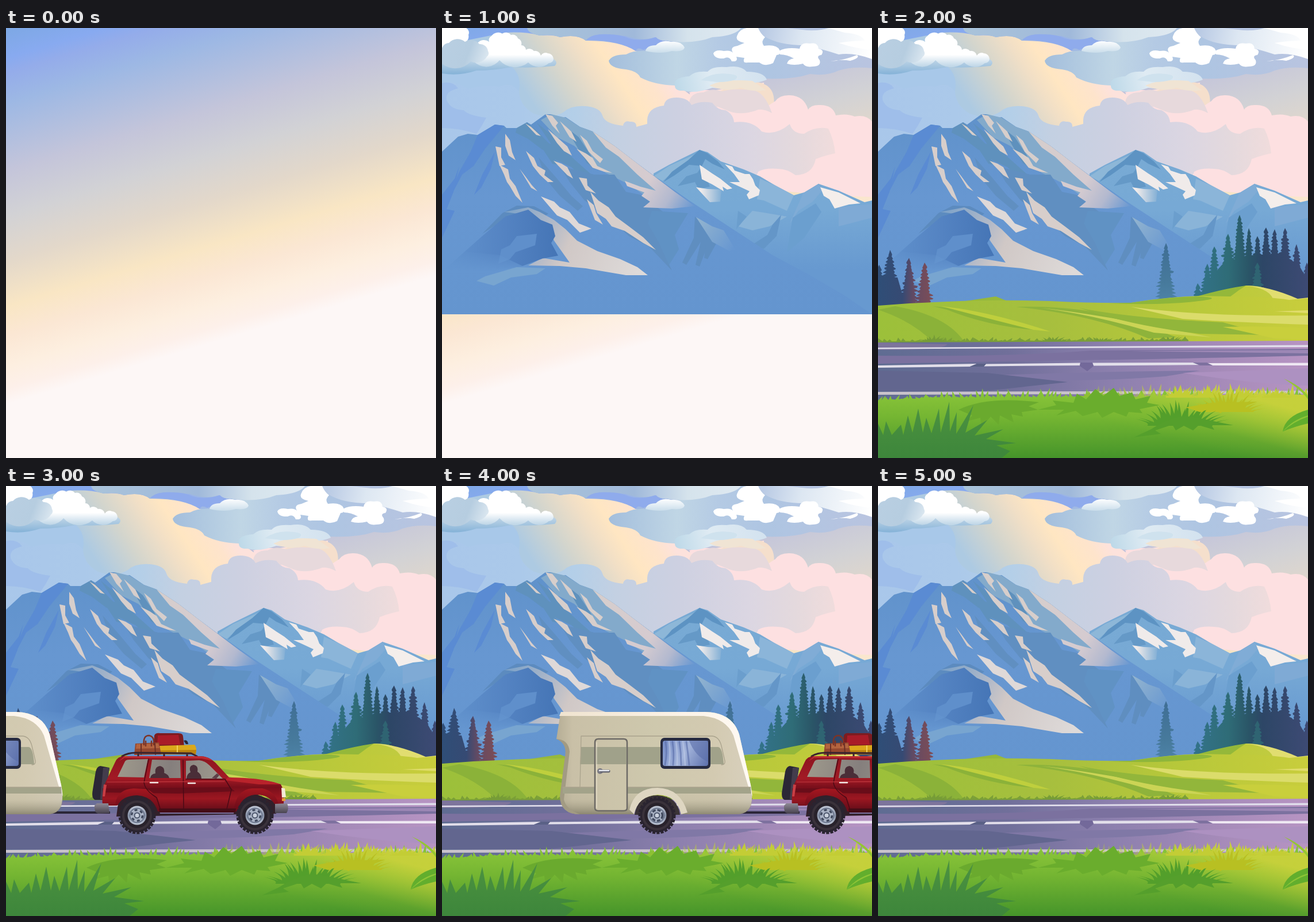
An HTML page that plays this animation: 748x748 px, repeating every 5.5 s.

```html
<!DOCTYPE html>
<html lang="en">
<head>
<meta charset="utf-8">
<title>Mountain road trip</title>
<style>
html,body{margin:0;width:100%;height:100%;overflow:hidden;background:#fdf7f6}
svg{display:block;width:100vw;height:100vh}
</style>
</head>
<body>
<svg id="stage" viewBox="0 0 748 748"><defs></defs></svg>
<script>
const stage = document.getElementById('stage');
const defs = stage.firstChild;

function el(tag, attrs, parent) {
  const e = document.createElementNS('http://www.w3.org/2000/svg', tag);
  for (const k in attrs) e.setAttribute(k, attrs[k]);
  parent.append(e);
  return e;
}
const layer = (parent = stage, attrs = {}) => el('g', attrs, parent);

function grad(id, x1, y1, x2, y2, stops) {
  const g = el('linearGradient', {id, x1, y1, x2, y2, gradientUnits: 'userSpaceOnUse'}, defs);
  stops.split(',').forEach(s => {
    const [offset, color, alpha = 1] = s.trim().split(' ');
    el('stop', {offset, 'stop-color': color, 'stop-opacity': alpha}, g);
  });
}
const paint = f => f[0] === '#' ? f : `url(#${f})`;
const path = (g, fill, d, more = {}) => el('path', {d, fill: paint(fill), ...more}, g);
const line = (g, color, width, d) =>
  path(g, '#0000', d, {stroke: color, 'stroke-width': width, 'stroke-linecap': 'round', 'stroke-linejoin': 'round'});
const box = (g, fill, x, y, width, height, rx = 0) => el('rect', {x, y, width, height, rx, fill: paint(fill)}, g);
const disc = (g, fill, cx, cy, r, more = {}) => el('circle', {cx, cy, r, fill: paint(fill), ...more}, g);

// One path per line: fill, then outline
function shapes(g, text) {
  text.trim().split('\n').forEach(row => {
    const [, fill, d] = row.trim().match(/^(\S+) (.+)$/);
    path(g, fill, d);
  });
}

// Cloud outline: flat lobes between clockwise points, long sides stay straight
function puff(g, fill, text) {
  const pts = text.split(' ').map(p => p.split(',').map(Number));
  let d = 'M' + pts[0];
  pts.forEach((p, i) => {
    const q = pts[(i + 1) % pts.length];
    const len = Math.hypot(q[0] - p[0], q[1] - p[1]);
    const r = len * .72;
    d += len > 75 ? `L${q}` : `A${r} ${r} 0 0 1 ${q}`;
  });
  path(g, fill, d + 'Z');
}

let seed = 7;
const rnd = () => (seed = seed * 16807 % 2147483647) / 2147483647;

function tree(g, fill, x, top, bottom, w) {
  const left = [], right = [];
  const side = (pts, dir, y, half) => {
    const reach = half * (.7 + rnd() * .5);
    pts.push([x + dir * reach, y + 1 + rnd() * 3], [x + dir * reach * .9, y + 4], [x + dir * half * .6, y + 5]);
  };
  for (let y = top + 6; y < bottom; y += 6) {
    const half = 2 + w * ((y - top) / (bottom - top)) ** .8;
    side(left, -1, y, half);
    side(right, 1, y, half);
  }
  path(g, fill, `M${x},${top}L${right.join('L')}L${left.reverse().join('L')}Z`);
}

// Row of blades on a base line that runs from y0 to y1
function fringe(g, fill, x0, x1, y0, y1, h, step, deep = 8) {
  let d = `M${x0},${y0 + deep}`;
  for (let x = x0; x < x1; x += step) {
    const y = y0 + (y1 - y0) * (x - x0) / (x1 - x0);
    d += `L${x},${y}L${x + step * (rnd() * 1.8 - .4)},${y - h * rnd()}`;
  }
  path(g, fill, d + `L${x1},${y1}L${x1},${y1 + deep}Z`);
}

// Fan of curved blades
function bush(g, fill, cx, cy, w, h, n) {
  let d = '';
  for (let i = 0; i < n; i++) {
    const u = i / (n - 1) * 2 - 1;
    const x = cx + u * w * .6, tx = cx + u * w + rnd() * 8;
    const ty = cy - h * (1 - .75 * u * u) * (.6 + rnd() * .4);
    const b = w / n * 1.5;
    d += `M${x - b},${cy}Q${x},${(cy + ty) / 2} ${tx},${ty}Q${x + b},${(cy + ty) / 2} ${x + b},${cy}Z`;
  }
  path(g, fill, d);
}

grad('sky', 0, 0, 180, 601, '0 #7da8e4,.08 #88aaf0,.12 #94acea,.2 #9db8e4,.38 #c4c5da,.5 #d2d2d5,.62 #e3d8ca,.74 #f9e6c4,.82 #fbe7d4,.9 #fdefe0,.96 #fdf0ea,1 #fdf7f6');
grad('sun', 150, 120, 333, -1, '0 #adcae2,.29 #d3d5cd,.53 #f1dfc6,.68 #ffe6c2,.87 #fee4cc,1 #fde2dc');
grad('bank', 0, 0, 684, 0, '0 #a9c7ea,.2 #abc9ea,.34 #b4cfe8,.44 #c3d0e2,.6 #cdd0e1,.78 #dbd6e2,.9 #e4d9dd,1 #f0dcdc');
grad('mist', 290, 0, 748, 0, '0 #a3bedc,.26 #c0d6e5,.42 #b4cae4,.6 #aec5e2,1 #b9c4e0');
grad('fade', 0, 10, 0, 66, '0 #ffffff,.65 #ffffff,1 #c2d8e8');
grad('shelf', 0, 52, 0, 80, '0 #c6d9e8,1 #86b3d8');
grad('haze', 0, 20, 80, 50, '0 #b9cfe2,.6 #b6cde0,1 #dbe7f0');
grad('veil', 405, 105, 560, 70, '0 #bcd8e8,.4 #dfebf3,1 #d3e2ef');
grad('top', 150, 0, 520, 0, '0 #a9c3da,.5 #a0b9da,.75 #d5e3ec,1 #dfe9f1');
grad('wing', 560, 0, 748, 40, '0 #b9cae4,.35 #dde7f2,1 #ffffff');
grad('small', 0, 22, 0, 44, '0 #ffffff,1 #c8dcea');

const base = layer();
box(base, 'sky', 0, 0, 748, 748);

const clouds = layer();
shapes(clouds, `
sun M0,30L110,8Q145,6 170,13Q195,11 205,16Q235,10 250,22Q310,22 337,40Q372,50 385,80L430,115L560,95L560,282Q500,276 465,276Q390,290 270,290L0,279Z
#f5dfcc M480,112Q535,82 565,100Q582,112 576,140L500,140Z
#fde0e1 M430,112Q470,100 500,122L560,140L580,127Q588,116 605,117Q630,118 637,142Q642,133 658,134Q680,134 685,152Q704,148 718,154Q738,150 748,163L748,294Q620,290 515,273L480,200Z
#e7d9dc M430,136Q428,112 455,112Q470,104 487,110Q510,104 538,108Q560,108 574,148Q555,138 545,144Q520,152 500,145L480,137Z
bank M0,75L60,80L100,100Q120,95 134,108Q134,135 160,149Q190,160 212,146Q225,134 250,136Q275,138 279,152Q283,167 315,170Q317,160 327,163Q339,162 338,172L360,166L360,262Q340,275 320,288L270,290Q140,284 40,277L0,279Z
bank M357,263L357,160Q358,138 386,135Q388,120 410,121Q428,122 434,134Q450,126 470,130Q480,143 493,143Q507,150 508,164Q540,160 556,180Q580,188 605,167Q610,184 630,184Q650,170 672,175Q682,195 684,218Q665,222 650,228Q645,255 615,256Q600,245 585,245Q562,243 550,250Q545,266 520,266L515,273Q490,272 489,266L487,250Q478,264 465,262Q440,282 400,279Q385,265 357,263Z
#9fbeea M0,95Q20,92 28,105Q5,110 8,125Q14,142 38,143Q45,152 77,156L68,172L60,184Q30,174 0,174Z
#a8c8e9 M0,65L110,60Q140,75 134,110Q120,92 100,102Q70,98 45,106Q20,90 0,96Z
mist M290,57Q296,46 320,46Q335,38 360,40Q385,30 420,22L470,0L748,0L748,70Q715,66 690,74Q670,84 640,80Q610,90 565,88Q530,96 500,98L405,100Q370,99 345,86Q340,75 320,72Q292,70 290,57Z
top M148,0L520,0Q510,14 470,16Q440,28 395,23Q380,24 370,16Q350,24 320,14Q300,12 290,12Q262,9 250,22Q236,10 205,16Q190,10 172,13Q150,10 148,0Z
#8fabec M252,20Q262,9 290,11Q310,11 325,18Q345,24 372,16Q380,24 395,22L350,38Q340,32 337,40Q310,22 252,20Z
veil M405,100Q402,86 430,84Q440,74 462,76Q470,66 495,68Q520,64 530,76Q560,76 565,90Q540,100 520,92Q500,108 470,104Q440,115 420,109Q405,110 405,100Z
#f0e4d4 M465,100Q490,88 540,92L563,108Q540,112 520,104Q490,112 465,100Z
#cfe2ee M450,91Q470,76 500,80Q520,82 510,90Q490,96 470,93Z
small M354,40Q356,30 372,30Q382,20 398,24Q416,22 422,34Q420,42 400,40Q380,46 354,40Z
shelf M0,60Q30,52 90,56L190,52Q204,58 196,66Q160,70 120,68Q90,74 60,74Q30,84 0,79Z
wing M545,0L748,0L748,54Q715,42 690,46Q660,36 630,30Q585,30 560,14Z
#b6c5e2 M600,0L672,0Q660,5 635,4Z
#ffffff M672,0L748,0L748,38Q720,36 690,26Q715,22 735,22Q730,10 700,8Z
#ffffff M676,58Q700,56 722,47Q728,52 710,57Q695,54 676,58Z
#ffffff M472,44Q476,37 490,40Q502,38 506,43Q500,33 514,31L526,26Q508,22 514,12Q518,2 530,0L550,0Q554,10 562,16Q554,24 560,31Q582,28 587,38Q592,46 582,47L576,61Q562,68 552,60L532,60Q522,62 526,52L512,50Q516,59 504,58Q500,48 490,53Q474,54 472,44Z
#ffffff M588,39Q600,33 622,36Q624,24 640,27Q654,24 655,36Q666,38 660,47Q650,48 657,56Q660,67 645,67Q632,69 628,62Q612,66 600,62Q602,54 612,53Q600,46 588,46Z
`);
puff(clouds, 'fade', '0,26 0,0 42,0 46,12 38,26 0,34');
puff(clouds, 'fade', '55,40 62,26 82,24 86,14 105,10 120,12 132,18 138,30 146,38 160,40 172,48 184,44 194,54 186,61 150,60 100,56 60,62');
puff(clouds, 'haze', '0,38 12,26 40,24 65,28 80,40 78,50 50,58 0,62');

grad('ridge', 0, 160, 0, 498, '0 #6092cb,.4 #6797d1,1 #6495cf');
grad('far', 0, 212, 0, 420, '0 #78aad4,.5 #77a9d5,1 #6799d0');
grad('knoll', 20, 0, 200, 0, '0 #6091cc,.5 #5483c2,1 #4575b6');
grad('foot', 0, 385, 0, 424, '0 #6596d0 0,1 #6596d0 1');
grad('snow', 250, 190, 440, 310, '0 #d6cecc,.6 #d5cbd0,.8 #b3b9cf,1 #6797d1');
grad('field', 100, 320, 340, 430, '0 #759fc9,.35 #b1b9c8,.5 #d0c8c6,1 #dedad9');
grad('facet', 442, 330, 510, 380, '0 #94b5cf,1 #6797d1');
grad('glint', 450, 0, 485, 0, '0 #f0ebea,1 #86b1d6');

const peaks = layer();
shapes(peaks, `
far M368,253L395,238L448,212L462,216L485,232L525,246L553,258L580,274L612,291L630,286L655,271L690,283L735,303L748,300L748,498L368,498Z
#8db7d8 M368,258L395,240L440,220L425,238L400,252L384,266Z
#8bb5d9 M553,262L580,274L612,291L600,318L560,300L548,298Z
#5d93c3 M448,212L462,218L480,232L492,246L470,236L458,228L452,240L430,238L405,256L385,268L400,250L428,230Z
#6599c7 M452,240L444,252L425,258L410,275L440,268L446,280L466,276Z
#f0ebea M448,238L470,253L484,262L505,279L496,281L488,276L490,284L470,272L462,268L452,263Z
#f0ebea M492,237L505,241L509,248L527,254L535,254L541,263L545,274L553,282L551,291L534,298L530,290L535,284L520,277L500,268L518,268L508,254Z
glint M442,277L462,280L486,281L484,302L466,303Z
#8ab4d8 M515,345L540,318L565,322L600,328L570,345L540,352Z
#6b9ecd M515,318L530,328L512,350Z
#6496c8 M590,325L582,362L560,384L535,380L566,360L575,342Z
#80acd6 M628,288L655,271L662,282L645,302L620,318L605,340Z
#7faad5 M690,312L748,306L748,330L690,345Z
#6b9fcf M610,330L650,305L660,320L630,365L600,390Z
#f4eeeb M658,277L690,286L728,305L708,307L683,314L674,298L664,292Z
ridge M0,215L28,189L45,184L62,186L92,168L108,170L112,174L130,174L148,164L155,168L180,150L190,150L205,157L215,155L240,172L262,180L300,205L335,232L370,258L430,300L500,346L575,395L640,430L700,465L748,498L0,498Z
#5a8bd3 M62,186L92,168L108,170L75,210L55,240L35,255L22,280L10,300L30,250L50,215Z
#5a8bd3 M0,290L22,262L30,240L20,285L8,315L22,318L0,365Z
#5a8bd3 M92,215L85,245L68,278L56,290L70,255Z
#83aacb M172,160L190,150L215,156L240,172L262,180L300,205L335,232L372,260L395,285L365,300L325,272L285,252L262,235L230,205L200,190Z
#5f91bd M130,174L148,164L168,182L190,205L175,212L150,193L128,182Z
#5f91bd M165,165L190,185L215,215L260,255L248,262L225,242L195,228L210,240L192,236L165,195L190,202Z
#5f91bd M215,172L238,190L258,220L270,246L252,235L238,212Z
#608fc1 M205,240L265,255L300,255L320,285L345,290L385,320L388,345L360,332L385,390L400,422L360,380L325,362L285,325L248,300L222,268Z
#608fc1 M168,225L200,262L225,292L245,310L236,318L205,292L180,262Z
#6092c4 M365,318L428,322L405,360L412,385L395,412L378,375L358,340Z
#5f8ec0 M440,328L456,345L465,370L448,415L441,412L450,372L425,412L418,408L438,365Z
#5f8ec0 M462,352L477,375L462,402L456,400Z
facet M442,329L470,345L490,352L510,385L500,388L470,372Z
snow M262,180L300,205L335,232L372,260L405,285L440,310L400,314L350,312L362,302L347,292L352,286L322,275L318,266L345,276L372,283L340,255L308,224L285,208Z
`);
shapes(peaks, `
#d7cecb M180,150L192,153L202,165L198,170L205,184L192,170Z
#d7cecb M145,166L155,172L172,188L164,186Z
#d7cecb M184,176L200,190L218,206L226,222L212,214L200,200Z
#d7cecb M205,162L225,180L234,198L222,190Z
#d7cecb M234,210L250,218L262,226L270,240L296,252L282,250L262,243L250,228Z
#d7cecb M240,186L252,196L262,214L280,228L275,235L255,215Z
#d7cecb M110,184L118,195L122,216L128,230L116,222L110,205Z
#d7cecb M93,206L103,208L103,225L110,238L100,240Z
#d7cecb M100,238L115,246L118,262L128,275L140,304L128,292L118,275L113,268L108,255Z
#d7cecb M146,214L160,226L166,240L180,248L178,256L194,268L184,268L170,255L158,240Z
#d7cecb M135,245L145,258L156,273L166,284L155,278Z
#d7cecb M194,231L208,236L218,242L228,262L218,256Z
#d7cecb M238,260L252,262L253,274L268,288L250,282Z
#d7cecb M258,285L272,300L290,312L302,328L325,345L350,364L372,386L350,374L318,353L295,345L285,332L270,322Z
#d7cecb M252,298L264,308L268,322L280,342L266,334Z
#dfd9d8 M172,293L195,302L205,312L222,320L238,340L260,349L240,356L218,334L200,326Z
#5c8bbf M70,358L105,322L130,309L160,310L185,323L170,334L140,322L110,332Z
field M108,320L150,312L170,320L195,334L215,350L235,370L270,388L310,402L340,416L358,430L320,430L250,418L205,414L150,413L175,400L222,408L195,370L185,345L155,326Z
knoll M18,408L70,362L110,328L150,316L172,334L192,342L197,362L190,374L202,396L175,401L140,414L80,424L0,424Z
#5f8fcb M98,410L103,385L118,378L130,362L165,358L162,378L128,390L118,402Z
foot M0,385L100,395L140,414L80,425L0,425Z
#78a5d0 M75,432L130,416L180,418L165,428L120,434L90,448L60,440Z
`);

grad('pineL', 0, 0, 95, 0, '0 #2f4e77,.45 #364a73,.65 #634a63,1 #7d4d56');
grad('pineR', 550, 0, 748, 0, '0 #33738a,.3 #2f6c77,.48 #2a5567,.6 #2d4666,1 #3d4a74');
grad('pineM', 0, 374, 0, 490, '0 #3f6e95,.6 #477a9c,1 #5087ad');
grad('hill', 556, 0, 748, 0, '0 #b9c936,1 #c4cc44');

const woods = layer();
[[21, 386, 20], [2, 412, 15], [54, 400, 18], [81, 408, 15]].forEach(([x, y, w]) => tree(woods, 'pineL', x, y, 485, w));
tree(woods, 'pineM', 501, 374, 488, 19);
[[556, 444, 9], [573, 410, 14], [585, 380, 13], [609, 358, 22], [629, 325, 20], [645, 348, 14], [660, 362, 15], [675, 347, 17],
 [690, 350, 17], [708, 348, 19], [728, 376, 17], [746, 408, 14]].forEach(([x, y, w]) => tree(woods, 'pineR', x, y, 478, w));
shapes(woods, `
pineL M0,428L10,432L34,434L42,462L60,478L56,488L0,489Z
pineR M556,472L575,438L600,410L640,396L700,392L732,412L748,440L748,476Z
`);
tree(woods, '#2f6472', 660, 408, 472, 13);
shapes(woods, `
#94b83a M468,497Q560,460 640,448Q692,448 692,475L690,490Q610,490 570,498L520,511Z
#e1dd70 M640,448Q680,449 730,471L748,469L748,497L650,492Z
hill M556,504Q590,485 628,456L640,448Q690,454 688,480L684,489L748,493L748,508L742,511Q700,496 640,495Q600,512 556,504Z
`);

grad('meadow', 0, 0, 748, 0, '0 #9cc03a,.4 #a7bf3e,.7 #b7c83a,1 #c8cd3c');
grad('road', 0, 600, 748, 570, '0 #5f6c92,.3 #706f9a,.55 #8d80ae,.8 #a68bb9,1 #b794c3');
grad('turf', 0, 640, 0, 748, '0 #86c238,.35 #74b532,1 #45942a');
grad('glow', 610, 745, 640, 640, '0 #b5cb36 0,.35 #b5cb36 .15,.7 #c0cf38 .6,1 #c9d13b .95');
grad('dusk', 0, 650, 0, 748, '0 #4d9340,1 #3d863b');

const land = layer();
shapes(land, `
#96b83c M120,480Q165,473 205,467L230,477Z
meadow M0,483Q60,478 120,476Q200,472 300,475Q380,479 440,478Q500,468 560,466L610,467Q680,467 715,473L748,470L748,547L0,549Z
#8bb239 M0,490Q60,510 95,546L150,546Q120,500 30,484Z
#8bb239 M95,484Q180,490 290,526Q200,522 120,490Z
#bfcf3d M110,484Q190,492 300,528L270,525Q190,505 110,484Z
#8eb33b M240,485Q340,482 420,504L520,538L470,540Q380,500 240,485Z
#cbd455 M285,487Q400,500 580,538L480,530Q380,500 285,487Z
#92b63b M350,487Q440,505 600,512L680,534L560,532Q440,518 350,487Z
#dbdc6b M440,485Q560,502 748,500L748,516Q620,512 530,506Z
#8fb63a M440,478Q500,468 560,467Q610,470 540,477Q480,482 400,479Z
#e0dc6b M690,493L748,491L748,496Z
#c9cf3c M600,520Q680,518 748,522L748,542L690,540Z
`);
fringe(land, '#7b9f38', 0, 540, 545, 543, 7, 8, 5);
[[95, 30, 13], [305, 32, 12], [390, 26, 10], [510, 28, 11]].forEach(([x, w, h]) => bush(land, '#769c37', x, 546, w, h, 12));
shapes(land, `
road M0,547L748,544L748,650L0,650Z
#7d749c M0,547L120,550Q120,558 40,560L0,560Z
#7b719f M0,570Q240,572 370,561L748,558L748,570Q500,576 330,578L0,584Z
#9c87b5 M440,562L748,560L748,566Z
#8078a6 M180,605Q360,598 560,596L500,606Q320,620 180,605Z
#ad91c1 M530,600L748,592L748,622Q660,620 530,600Z
#62668f M0,596L190,600L330,616L180,632L0,632Z
#e0ddeb M0,556L748,551.5L748,555L0,558.5Z
#e2dfea M0,587L172,584L160,589L0,591Z
#e2dfea M188,584.5L352,582.5L351,587L184,588.5Z
#e2dfea M373,582.5L548,582L560,586L375,587.5Z
#eee7f2 M572,583L748,582.5L748,587L582,587Z
#5a6186 M160,589L172,584L188,584L184,589Z
#73699a M352,582L373,582L375,588L364,597L351,588Z
#7d719f M548,582L572,582L582,587L560,587Z
#c9c3cc M0,633L748,631L748,636L0,638Z
`);
fringe(land, 'turf', 0, 112, 648, 642, 9, 6, 110);
fringe(land, 'turf', 108, 748, 643, 640, 17, 7, 110);
path(land, 'turf', 'M0,648L748,640L748,748L0,748Z');
fringe(land, 'glow', 380, 748, 640, 638, 22, 8, 110);
bush(land, '#8fbf33', 375, 642, 30, 16, 9);
[[525, 24], [575, 27], [632, 20], [692, 16]].forEach(([x, h]) => bush(land, '#c3cd35', x, 643, 34, h, 11));
bush(land, '#b8c022', 606, 668, 68, 42, 17);
bush(land, '#539f2b', 525, 692, 84, 50, 20);
shapes(land, `
#6aaa2e M140,664Q190,640 280,651L262,658L278,664L250,668L252,676L232,672L236,686L212,674L210,690L196,676L180,694L178,678L155,684L164,674Z
#6aad2d M278,664L310,656L304,648L340,652L346,636L362,646L378,628L392,640L410,626L420,640L442,634L448,646L474,640L468,652L490,656L455,663L460,670L436,668L432,676L410,668L390,678L382,668L356,675L344,666L310,674L324,664Z
#559f2c M445,712L475,698Q520,668 555,678L618,691L580,691L585,699L558,691L548,700L532,692L518,700L512,690L482,700L492,706Z
#b8c022 M535,660L580,652L660,650L632,660L628,668L606,662L596,670L580,662L560,668Z
#62ae2d M704,702Q708,675 748,664L748,688Q725,693 704,702Z
#8ec536 M704,702Q722,681 748,674L748,676Q722,685 704,702Z
#94c633 M706,610Q735,622 748,640L748,646Q735,628 706,610Z
dusk M0,688L9,708L14,684L24,708L40,690L44,708L52,674L60,704L70,662L78,704L84,678L93,705L106,662L109,704L124,650L125,702L137,668L136,706L166,656L152,704L190,682L168,709L218,698L188,715L240,722L206,726L230,736L215,748L0,748Z
`);

grad('coat', 0, 470, 0, 568, '0 #8c1520,.4 #a31a25,.55 #790f1b,.75 #9c1721,1 #590b17');
grad('pane', 190, 475, 380, 510, '0 #a09b8d,.5 #857f7d,1 #a09c90');
grad('fender', 0, 508, 0, 560, '0 #bd282d,.4 #a0161f,1 #6e0d1a');
grad('chrome', 0, 550, 0, 570, '0 #958f9b,.4 #77717d,1 #45404d');
grad('shell', 200, 0, 540, 0, '0 #b6ae96,.08 #c9c0a7,.5 #cec8ad,.8 #d3cab1,1 #d8d0bd');
grad('skirt', 0, 520, 0, 571, '0 #a7a28a 0,.5 #a7a28a .2,1 #77735f .75');
grad('rim', 0, 556, 0, 590, '0 #c3cad8,.5 #8791a6,1 #bcc5d4');
grad('glass', 380, 440, 466, 490, '0 #7188c4,.5 #a2b3da,1 #566aa8');
grad('cream', 205, 0, 540, 0, '0 #efe3cf,.6 #fbf2e6,1 #fffaf4');

const rig = layer();

function wheel(g, x, y, spokes) {
  disc(g, '#2a2430', x, y, 29.5, {stroke: '#2a2430', 'stroke-width': 6, 'stroke-dasharray': '5 2'});
  disc(g, '#3a323b', x, y, 26);
  disc(g, '#28222b', x, y, 22);
  disc(g, 'rim', x, y, 16.5);
  disc(g, '#a9b2c4', x, y, 12.5, {stroke: '#5f6a82', 'stroke-width': 1.5});
  disc(g, '#0000', x, y, 9.5, {stroke: '#414a5f', 'stroke-width': 3.5, 'stroke-dasharray': spokes});
  disc(g, '#c9d0dd', x, y, 4.5, {stroke: '#4d576d', 'stroke-width': 2});
}

// Caravan
const van = layer(rig, {transform: 'translate(-441)'});
box(van, '#2b2638', 500, 566, 122, 4);
path(van, '#3a3336', 'M335,572Q340,538 375,538Q410,540 414,572Z');
shapes(van, `
shell M207,393L458,393Q505,394 517,432L537,520Q547,571 512,571L416,571Q410,538 375,537Q340,540 334,571L240,571Q206,571 206,540L216,470Q220,446 199,440L205,402Z
skirt M208,525L538,525Q547,571 512,571L416,571Q410,538 375,537Q340,540 334,571L240,571Q206,571 206,540Z
cream M207,393L458,393Q505,394 517,432L537,520L540,540L532,520L507,434Q494,404 455,400L204,400Z
#a29b83 M199,440Q220,441 222,462L212,545Q215,562 240,571Q206,571 205,540L214,470Q218,448 199,440Z
#a1a28a M242,454L480,454Q488,454 490,484L240,484Z
#a3a38a M210,524L537,524L538,535L210,535Z
#ded6c1 M326,563Q335,525 375,525Q415,526 427,568L416,571Q408,537 375,537Q342,538 334,571Z
`);
line(van, '#aaa38d', 1.3, 'M242,435L470,435Q482,436 486,452L492,478Q493,485 486,485M242,435L240,525M210,524L537,524');
path(van, 'shell', 'M272,440L316,440Q322,440 322,446L322,560Q322,565 316,565L272,565Q266,565 266,560L266,446Q266,440 272,440Z', {stroke: '#6d6a66', 'stroke-width': 2.5});
box(van, '#a0a18a', 268, 454, 53, 30);
line(van, '#eee7d5', 1, 'M269,446L269,560');
disc(van, '#7b7a82', 275, 496, 5);
line(van, '#5f606d', 5, 'M277,496L290,496');
line(van, '#e8eaf0', 2.5, 'M274,495L290,495');
box(van, '#272b41', 380, 438, 87, 54, 7);
box(van, 'glass', 384, 443, 79, 44, 4);
for (let i = 0; i < 7; i++) line(van, i % 2 ? '#c4d0ea80' : '#4c60a080', 3, `M${389 + i * 6},445Q${392 + i * 6},465 ${388 + i * 7},485`);
path(van, '#5a6eab', 'M430,443L463,443L463,480Q440,470 430,443Z', {opacity: .6});
wheel(van, 374, 573, '6 3');

// Car
const car = layer(rig);
shapes(car, `
#2b2736 M164,487L180,490L172,546L155,546Q148,543 151,528L156,497Q158,488 164,487Z
#433c4c M169,490L180,490L172,545L164,545Z
#32202a M192,575L196,545L228,535L262,548L268,570L396,570L402,545L433,535L470,550L470,570Z
#7c1c20 M258,434Q260,429 268,430L300,430Q308,430 308,436L310,453L257,453Z
#a91c28 M264,434L300,433L303,450L263,450Z
#dba81b M266,452L328,450Q333,456 330,466L264,467Z
#b98210 M266,460L331,459L330,467L264,467Z
#96492f M225,448L266,446L270,467L223,468Z
#b4643f M227,449L265,448L267,456L226,457Z
#2c2632 M309,443Q316,440 317,449L313,449Z
`);
line(car, '#7d3426', 2.5, 'M240,450Q238,434 249,434Q259,436 257,450M243,452L243,444M253,452L253,444');
line(car, '#6b2f26', 2, 'M235,449L235,467M259,448L260,467');
line(car, '#efd05a', 2, 'M298,452L298,464');
line(car, '#39232e', 3, 'M202,470Q212,464 226,464L322,465L332,470M230,464L230,470M275,465L275,470M315,465L315,470');
shapes(car, `
coat M172,518L190,480Q194,470 206,470L338,470Q352,470 364,481L389,508Q445,508 478,519Q484,528 483,553L470,556Q462,535 433,535Q405,537 399,566L266,566Q258,538 228,536Q200,537 193,556L168,556Q166,535 172,518Z
#bd2a32 M206,470L338,470Q350,470 360,478L340,474L206,473L196,479Z
#b9232b M385,507Q445,507 478,519L440,519L382,512Z
#690d19 M168,526L390,524L398,531L300,535L169,533Z
fender M190,552Q195,527 222,526L244,527Q266,535 270,566L264,566Q256,540 228,538Q202,539 194,556Z
fender M396,566Q400,528 428,526L446,526Q468,531 474,553L467,553Q456,536 433,537Q408,540 403,566Z
pane M194,506L207,479Q209,476 214,476L247,475L240,507Z
pane M249,508L254,476L303,477L304,508Z
pane M313,509L313,478L336,477Q346,478 354,486L377,509Z
#4a2e38 M251,508Q252,501 260,500Q258,488 268,487Q277,489 275,499Q283,502 284,508Z
#4a2e38 M314,509Q315,500 321,498Q317,487 326,485Q335,486 333,497Q340,501 340,509Z
#5d4148 M358,508L367,500L371,503L366,509Z
chrome M158,552L178,552L180,569L160,570Q153,568 154,556Z
chrome M468,553L489,552Q493,561 488,569L468,569Z
#f4ead7 M479,525L485,526L487,541L480,542Z
#e89a3d M480,543L486,543L486,548L480,548Z
#c93f45 M170,519L175,520L172,540L168,540Z
#450d16 M266,561L400,561L399,568L267,568Z
`);
line(car, '#4a0a15', 1.5, 'M248,475L240,516Q242,530 262,542L268,561M308,477L309,562M313,510L381,510L392,528L384,562');
line(car, '#c23a40', 1.2, 'M176,515L380,514');
line(car, '#efe6e4', 2.5, 'M251,516L264,516M317,517L329,517');
wheel(car, 228, 573, '5 5');
wheel(car, 433, 573, '5 5');

// Scene builds up in half-second steps, then the rig drives through
const STEP = 500, LOOP = 5500, FIRST = 5;
const drive = [-155, 0, 151, 441, 742];
const show = (g, on) => g.setAttribute('visibility', on ? 'visible' : 'hidden');
const start = performance.now();

function draw() {
  const step = Math.floor((performance.now() - start) % LOOP / STEP);
  [clouds, peaks, woods, land].forEach((g, i) => show(g, step > i));
  const x = drive[step - FIRST];
  show(rig, x !== undefined);
  if (x !== undefined) rig.setAttribute('transform', `translate(${x})`);
  requestAnimationFrame(draw);
}
draw();
</script>
</body>
</html>
```
